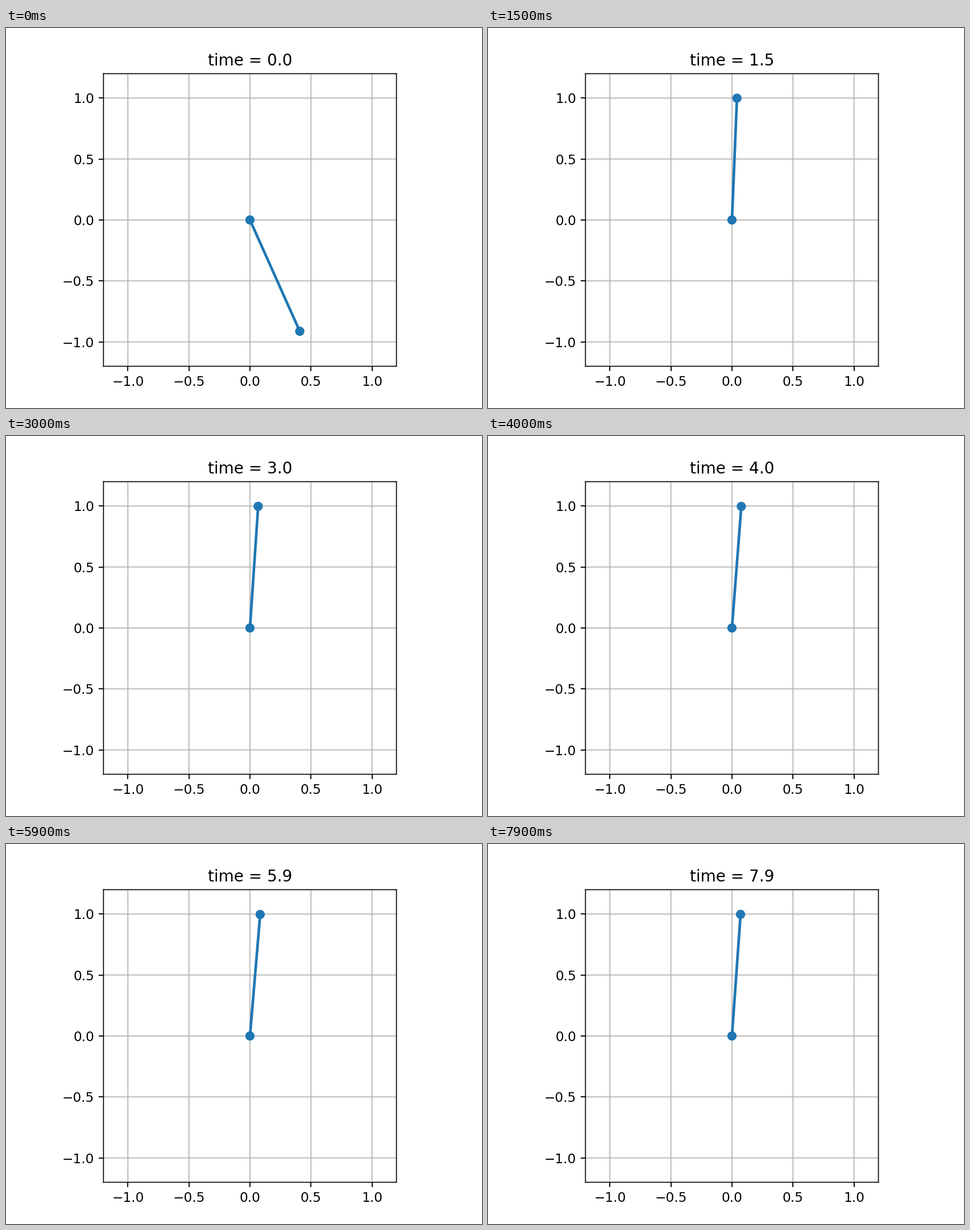
These frames come from a looping animation (837 by 669 pixels, 8 s). A matplotlib script:

```python
import numpy as np
import matplotlib.pyplot as plt
from matplotlib.animation import FuncAnimation

W, H, DPI = 837, 669, 167.4
FRAMES, STEP_MS = 80, 100
START = -3.562   # angle from upright, hanging to the right
RATE = 5.45      # speed of the swing-up
BALL = 0.0379

plt.rcParams.update({
    "path.snap": False,
    "axes.linewidth": 0.72,
    "grid.linewidth": 0.72,
})


def angle(t):
    """Critically damped swing-up to a slowly swaying rest angle."""
    rest = 0.0783 - 0.011 * np.cos(1.45 * (t - 7.35))
    x = RATE * t
    return rest + (START - rest) * np.exp(-x) * (1 + x + x**2 / 2)


fig, ax = plt.subplots(figsize=((W + 0.01) / DPI, (H + 0.01) / DPI), dpi=DPI)
fig.subplots_adjust(bottom=0.1098, top=0.8798)
ax.set(xlim=(-1.2, 1.2), ylim=(-1.2, 1.2), aspect="equal")
ticks = np.linspace(-1, 1, 5)
ax.set_xticks(ticks)
ax.set_yticks(ticks)
ax.grid(True)

rod, = ax.plot([], [], color="C0", lw=2)
pivot, bob = (ax.add_patch(plt.Circle((0, 0), BALL, fc="C0", lw=0, zorder=3))
              for _ in range(2))
title = ax.set_title("time = 0.0")


def update(frame):
    t = frame * STEP_MS / 1000
    a = angle(t)
    tip = np.sin(a), np.cos(a)
    rod.set_data([0, tip[0]], [0, tip[1]])
    bob.set_center(tip)
    title.set_text(f"time = {t:.1f}")
    return rod, bob, title


anim = FuncAnimation(fig, update, frames=FRAMES, interval=STEP_MS,
                     repeat=True, repeat_delay=0, blit=False)
plt.show()
```
